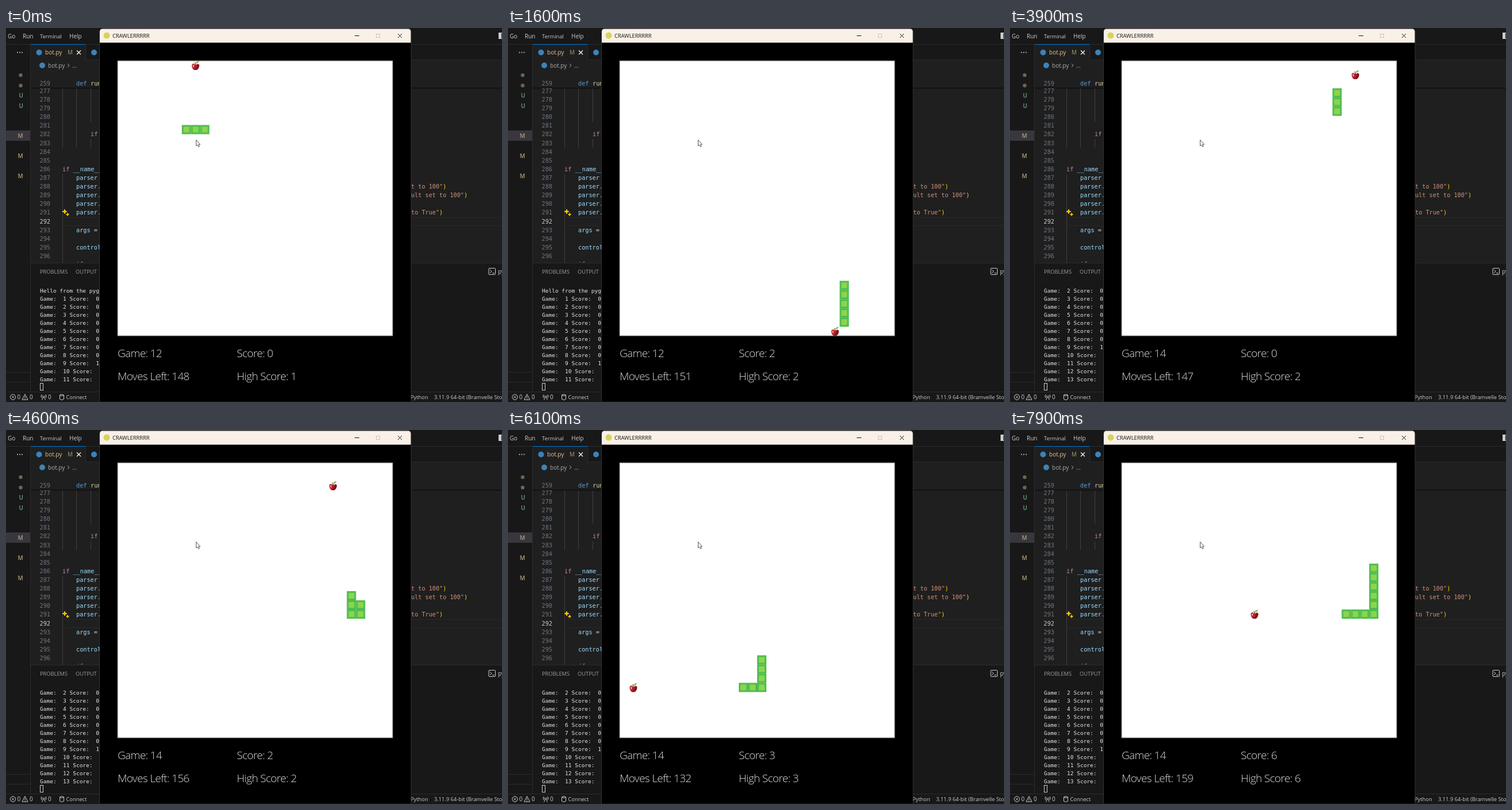
Write an HTML page that moves like this. It is 862x650 px and loops after 8 s.

```html
<!DOCTYPE html>
<html lang="en">
<head>
<meta charset="utf-8">
<title>Self-playing grid game</title>
<style>
html, body { margin: 0; width: 100%; height: 100%; overflow: hidden; background: #181818; }
svg { display: block; }
text { white-space: pre; font: 10px "Open Sans", "Noto Sans", sans-serif; }
.code { font: 10.2px "DejaVu Sans Mono", monospace; }
.term { font: 9.5px "DejaVu Sans Mono", monospace; }
.stat { font: 300 19px "Open Sans", "Noto Sans", sans-serif; letter-spacing: -.65px; }
.tab { font-size: 9.3px; }
.mark { font-weight: 600; }
</style>
</head>
<body>
<svg id="stage" width="862" height="650" viewBox="0 0 862 650"></svg>
<script>
const CELL = 478 / 30, LEFT = 194, TOP = 57, LOOP = 8000, FRAME = 100;

const rect = (x, y, w, h, fill, more = '') =>
  `<rect x="${x}" y="${y}" width="${w}" height="${h}" fill="${fill}" ${more}/>`;
const line = (d, color, width = 1) =>
  `<path d="${d}" fill="none" stroke="${color}" stroke-width="${width}"/>`;
const dot = (x, y, r, fill) => `<circle cx="${x}" cy="${y}" r="${r}" fill="${fill}"/>`;
const text = (x, y, s, fill, cls = '') =>
  `<text x="${x}" y="${y}" fill="${fill}" class="${cls}">${s}</text>`;

const C = {
  side: '#181818', editor: '#1f1f1f', rule: '#2b2b2b', ui: '#cccccc', dim: '#9d9d9d',
  num: '#6e7681', name: '#9cdcfe', flow: '#c586c0', string: '#ce9178', bracket: '#ffd700',
  changed: '#e2c08d', added: '#73c991', python: '#3c83b8'
};
const lineY = n => 127.9 + (n - 278) * 15.12;

function sidebar() {
  let s = rect(0, 178, 42, 18, '#37373d') + dot(25.5, 82, 3.2, '#6c6550') + dot(25.5, 100, 3.2, '#6c6550');
  for (const y of [121, 139]) s += text(22.5, y, 'U', '#69a781', 'mark');
  for (const y of [191, 226, 261]) s += text(20.5, y, 'M', '#b39a74', 'mark');
  for (const x of [20, 24, 28]) s += dot(x, 42.5, 1, C.ui);
  return s + line('M0 598.5H42M0 615.5H42', C.rule);
}

function tabs() {
  return text(3, 18, 'Go', C.ui) + text(29, 18, 'Run', C.ui) +
    text(59, 18, 'Terminal', C.ui, 'tab') + text(110, 18, 'Help', C.ui) +
    rect(43, 28, 95, 28, C.editor) + line('M43 28.5H138', '#0078d4') +
    line('M138.5 28V55M138 55.5H862M0 28.5H43M138 28.5H862M42.5 28V632', C.rule) +
    dot(57.5, 42.5, 5, C.python) + text(68, 46, 'bot.py', C.changed) +
    text(107, 46, 'M', '#a99a77') + line('M123 39l7 7M130 39l-7 7', '#fff', 1.2) +
    dot(153, 42.5, 5, C.python) + dot(63, 65, 5, C.python) +
    text(73, 69, 'bot.py', '#a9a9a9') + line('M107 62l3 3l-3 3', '#a9a9a9') + text(115, 69, '...', '#a9a9a9') +
    rect(856.5, 8.5, 10, 10, 'none', 'stroke="#ccc"') + rect(857, 9, 4, 9, '#ccc');
}

function code() {
  const at = (n, x, s, color) => text(x, lineY(n), s, color, 'code');
  let s = line('M98.5 105V208M122.5 105V208M147.5 105V163M147.5 193V208M98.5 254V408', '#404040') +
    line('M43 104.5H862', '#121212', 2) +
    line('M98 329.5H862M98 343.5H862', '#282828') +
    text(58.5, 100, '259', C.num, 'code') + text(122, 99.5, 'def', '#569cd6', 'code') +
    text(147, 99.5, 'run', '#dcdcaa', 'code');
  for (let n = 277; n < 297; n++) s += at(n, 58.5, n, n === 292 ? '#cccccc' : C.num);
  s += at(282, 147, 'if', C.flow) + at(286, 98, 'if', C.flow) + at(286, 116.5, '__name__', C.name) +
    at(287, 122, 'parser', C.name);
  for (const n of [288, 289, 290, 291]) s += at(n, 122, 'parser.', C.name);
  s += at(293, 122, 'args <tspan fill="#d4d4d4">=</tspan>', C.name) + at(295, 122, 'control', C.name) +
    at(296.9, 122, 'if', C.flow);
  const tail = (n, str) => at(n, 704, `${str}"<tspan fill="${C.bracket}">)</tspan>`, C.string);
  s += tail(288, 't to 100') + tail(289, 'ult set to 100') + tail(291, 'to True');
  const star = (x, y, r) => `<path fill="#ffcc00" d="M${x} ${y - r}Q${x} ${y} ${x + r} ${y}Q${x} ${y} ${x} ${y + r}` +
    `Q${x} ${y} ${x - r} ${y}Q${x} ${y} ${x} ${y - r}" stroke="#ffcc00"/>`;
  return s + star(102, 319, 4) + star(107, 324, 2.5);
}

function panel() {
  return rect(43, 408, 819, 224, C.side) + line('M43 408.5H862M0 632.5H862', C.rule) +
    text(59, 426.5, 'PROBLEMS', C.dim, 'tab') + text(121, 426.5, 'OUTPUT', C.dim, 'tab') +
    rect(839, 417.5, 11.5, 11, 'none', 'stroke="#ccc" rx="1"') + line('M841 420l3 3l-3 3M845 426h4', C.ui) +
    text(855, 427, 'py', C.ui) +
    '<g id="log"></g>' + rect(59.5, 617.5, 5, 12, 'none', 'stroke="#ccc"') +
    `<circle cx="12" cy="641.5" r="4.7" fill="none" stroke="#ccc"/>` +
    line('M10 639.5l4 4M14 639.5l-4 4M33 636.5l5 9.5h-10zM33 640v3M33 644v1', C.ui) +
    line('M62 637q-2 3 0 6M69 637q2 3 0 6M64 638.5q-1 2 0 3M67 638.5q1 2 0 3M65.5 640l-3 6.5M65.5 640l3 6.5', C.ui) +
    line('M93.5 638q3.5-3 7 0v7q-3.5 3-7 0zM93.5 638q3.5 3 7 0', C.ui) +
    text(19.5, 645, '0', C.ui) + text(41, 645, '0', C.ui) + text(73, 645, '0', C.ui) +
    text(104.5, 645, 'Connect', C.ui, 'tab') + text(703, 645, 'Python', C.ui, 'tab') +
    text(744, 645, '3.11.9 64-bit (Bramvelle Store)', C.ui, 'tab');
}

function gameWindow() {
  return '<path d="M162.5 650V7q0-6 6-6H698q6 0 6 6V650z" fill="#000" stroke="#333"/>' +
    '<path d="M163 25.5V6.500q0-5 5-5H698.500q5 0 5 5V25.500z" fill="#f9f1e7"/>' +
    dot(175, 13, 5.5, '#d6d45a') + text(185, 16.5, 'CRAWLERRRRR', '#111', 'tab') +
    line('M606 13.5h8M681 10l7 7M688 10l-7 7', '#111') +
    rect(643.5, 10.5, 6, 6, 'none', 'stroke="#c9c3bc"') +
    rect(LEFT, TOP, 478, 478, '#fff', 'stroke="#808080"') + '<g id="game"></g>' +
    '<path d="M330.5 194.5v10.5l2.3-2l1.7 3.6l1.7-.8l-1.6-3.5h2.9z" fill="#fff" stroke="#444" stroke-width=".9"/>';
}

document.getElementById('stage').innerHTML =
  rect(0, 0, 862, 650, C.side) + rect(43, 56, 819, 352, C.editor) +
  sidebar() + tabs() + code() + panel() + gameWindow();
const logView = document.getElementById('log'), gameView = document.getElementById('game');

// Corners of each run start at the tail; pace holds [time, moves made].
const games = [
  { id: 12, start: 0, pace: [[0, 2], [1600, 54], [1660, 55]],
    turns: [[11, 7], [7, 7], [7, 0], [24, 0], [24, 29]],
    apples: [[8, 0], [24, 20], [23, 29]] },
  { id: 13, start: 1660, pace: [[1955, 0], [2500, 17], [3530, 52]],
    turns: [[18, 5], [16, 5], [16, 8], [4, 8], [4, 20], [29, 20]],
    apples: [[4, 9], [29, 21]] },
  { id: 14, start: 3530, pace: [[3800, 0], [3900, 3], [5300, 48], [7000, 99], [7900, 131]],
    turns: [[23, 8], [23, 1], [26, 1], [26, 16], [25, 16], [25, 2], [15, 2], [15, 24], [1, 24],
      [1, 23], [2, 23], [2, 22], [0, 22], [0, 19], [7, 19], [7, 20], [18, 20], [18, 21],
      [22, 21], [22, 16], [27, 16], [27, 11]],
    apples: [[25, 1], [26, 16], [23, 2], [1, 24], [17, 20], [18, 20], [14, 16]] }
];

function walk(turns) {
  let [x, y] = turns[0];
  const cells = [[x, y]];
  for (const [tx, ty] of turns.slice(1))
    while (x !== tx || y !== ty) {
      x += Math.sign(tx - x);
      y += Math.sign(ty - y);
      cells.push([x, y]);
    }
  return cells;
}
for (const g of games) g.cells = walk(g.turns);

function movesAt(pace, t) {
  if (t <= pace[0][0]) return pace[0][1];
  for (let i = 1; i < pace.length; i++) {
    const [t0, n0] = pace[i - 1], [t1, n1] = pace[i];
    if (t <= t1) return Math.round(n0 + (n1 - n0) * (t - t0) / (t1 - t0));
  }
  return pace[pace.length - 1][1];
}

function drawCell([cx, cy]) {
  const x = LEFT + cx * CELL, y = TOP + cy * CELL;
  return rect(x, y, CELL + .1, CELL + .1, '#4fbd50') + rect(x + 3, y + 3, 10, 10, '#8bd54c');
}

function drawApple([cx, cy]) {
  return `<g transform="translate(${LEFT + cx * CELL} ${TOP + cy * CELL})">` +
    '<path d="M8 6Q3 3.5 1.5 7Q1 12 4.5 15.5Q8 16.5 11 15.500Q15 12 14.500 7Q13 4 8 6" fill="#b3202c"/>' +
    '<path d="M11 6q3-.5 3 3q-1 5-4 6.500q-3 .5-5-.5q5-2 6-9" fill="#7d1420"/>' +
    '<path d="M5 6q3-2 7-.5q-3 2.500-7 .5" fill="#e9c9a8"/>' +
    '<path d="M2.800 8q1.200-2 2.700-.5l-.5 4q-2 0-2.200-3.500" fill="#eaa5a2"/>' +
    line('M8 7Q8 4 6.500 2.500', '#4a2a1a') + '<path d="M8 4.500Q9 .5 14 .5Q13 4.500 8 4.500" fill="#7cb84f"/></g>';
}

function draw(t) {
  const game = games.filter(g => t >= g.start).pop();
  const moves = movesAt(game.pace, t), head = moves + 2;
  let score = 0, sinceMeal = moves;
  for (let n = 1; n <= moves; n++) {
    const [x, y] = game.cells[n + 2], [ax, ay] = game.apples[score];
    if (x === ax && y === ay) {
      score++;
      sinceMeal = moves - n + 1;
    }
  }
  const high = Math.max(game.id === 12 ? 1 : 2, score);
  const stats = [[194, 572, 'Game', game.id], [401, 572, 'Score', score],
    [194, 612, 'Moves Left', 150 + 5 * score - sinceMeal], [401, 612, 'High Score', high]];
  gameView.innerHTML = drawApple(game.apples[score]) +
    game.cells.slice(head - 2 - score, head + 1).map(drawCell).join('') +
    stats.map(([x, y, label, v]) => text(x, y, `${label}: ${v}`, '#dedede', 'stat')).join('');

  let rows = '';
  for (let i = 0; i < 12; i++) {
    const n = game.id - 12 + i;
    const s = n ? `Game:  ${n} Score:  ${n === 9 ? 1 : 0}` : 'Hello from the pyg';
    rows += text(59, 460 + i * 14, s.slice(0, 18), '#e6e6e6', 'term');
  }
  logView.innerHTML = rows;
}

const began = performance.now();
let shown = -1;
function tick() {
  const t = Math.floor((performance.now() - began) % LOOP / FRAME) * FRAME;
  if (t !== shown) draw(shown = t);
  requestAnimationFrame(tick);
}
tick();
</script>
</body>
</html>
```
